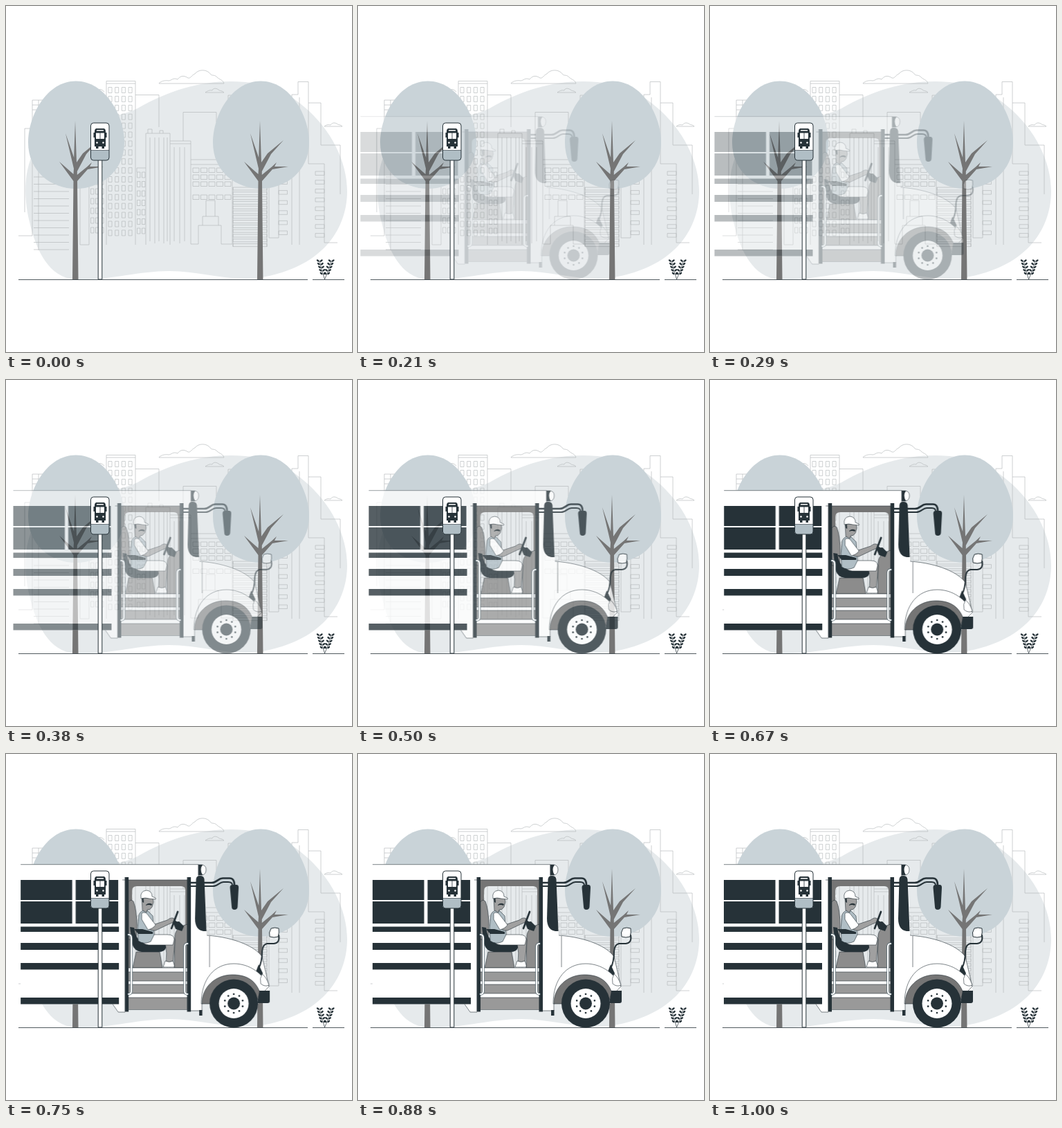
An HTML page that plays this animation: 500x500 px, repeating every 1.04 s.

```html
<!DOCTYPE html>
<html lang="en">
<head>
<meta charset="utf-8">
<title>Bus stop</title>
<style>
html, body { margin: 0; width: 100%; height: 100%; overflow: hidden; background: #fff; }
svg { display: block; width: 100vw; height: 100vh; }
.city { fill: none; stroke: #b4b8ba; stroke-width: .65; }
.dark { fill: #263238; }
.white { fill: #fff; }
.grey { fill: #757575; }
.seat { fill: #8c8c8c; }
.step { fill: #999; }
.skin { fill: #a0a0a0; }
.blue { fill: #b0bec5; }
.line { stroke: #263238; stroke-width: .6; stroke-linejoin: round; }
.pipe { fill: none; stroke: #263238; stroke-width: 2.7; stroke-linecap: round; }
.rail { fill: none; stroke-linecap: round; }
#gate { animation: gate 1.04s step-end infinite; }
#bus { animation: arrive 1.04s infinite; }
@keyframes gate {
  0% { visibility: hidden; }
  12.4%, 100% { visibility: visible; }
}
@keyframes arrive {
  0% { opacity: 0; transform: translateX(-20px); animation-timing-function: cubic-bezier(.36, -.01, .5, 1.38); }
  93%, 100% { opacity: 1; transform: none; }
}
</style>
</head>
<body>
<svg viewBox="0 0 500 500" xmlns="http://www.w3.org/2000/svg">
  <path fill="#e6eaec" d="M100 395C62 393 43 352 34 312C25 275 24 228 50 195C90 160 150 168 190 148C235 122 280 109 325 109C375 109 405 123 430 145C470 178 493 225 493 268C493 315 465 377 365 393C320 398 280 383 236 383C190 383 150 397 100 395Z"/>

  <g class="city">
    <path id="windows"/>
    <path d="M38 332H18M27 298V177H38M38 332V136H62M47 136V353M38 143H55M38 150H52"/>
    <path d="M107 235V345H120V235M130 124Q136 117 142 124"/>
    <path d="M145 345V108.500H187V345M145 112H187M187 128.500H221V175M189 240V234H202"/>
    <path d="M202 345V184H237V345M208 190V340M215 190V343M221 190V340M228 190V343M233 190V340M205 184V178H211V184M222 184V180H227V184"/>
    <path d="M237 195H267V344H278M237 199H267M243 204V340M251 204V343M258 204V340M256 195V153.500H304V168"/>
    <path d="M267 222H310M267 229H327M278 344V317H311V344H327V228M284 317V304H307V317M289 304V281H302V304"/>
    <path d="M321 145V129H335M328 348V262M377 348V262M380 262V335H394V250M413 345V128H422V109.500H437V228H460V342H479M424 132V345M437 140H455V201H483V272"/>
    <path d="M221 112H315C314 107 308 106 305 103C302 99 298 101 296 99C291 91 278 91 273 98C268 100 267 105 263 104C256 99 251 102 248 106C241 103 239 108 235 108C229 107 223 109 221 112Z"/>
    <path d="M288 125H315C312 122 309 123 307 121C303 118 299 119 298 122C294 121 291 123 288 125ZM460 174H486C483 171 480 172 478 170C474 168 471 169 469 172C465 171 462 172 460 174Z"/>
  </g>

  <defs>
    <g id="tree">
      <path fill="#c9d3d8" d="M101 108.500C143 108.500 171 158 171 197C171 240 136 264 101 264C66 264 32 240 32 197C32 158 59 108.500 101 108.500Z"/>
      <path class="grey" d="M96 395.500L97.500 253L77 225L97.500 243L98 235L86 184L98.200 219L100 166L102 226L111 213L134 194L116 214L102.800 239V244L117 232.500L124 226L121 232L141 232L118 236L103 253L104.500 395.500Z"/>
    </g>
  </defs>
  <use href="#tree"/>
  <use href="#tree" x="267"/>

  <path class="line" fill="none" style="stroke-width:.8" d="M18 395.500H436M443 395.500H489"/>
  <g id="plant" class="dark"></g>

  <g id="gate"><g id="bus">
    <!-- door opening -->
    <path class="grey" fill-rule="evenodd" d="M176 182H261V309H176ZM181 309V198Q181 191 188 191H252Q258 191 258 197V309Z"/>
    <path class="seat line" d="M242 309L243 262Q244 254 252 249L261 246V309Z"/>
    <path class="seat line" d="M176 214Q179 209 183 213Q188 225 188 250L187 268H176Z"/>
    <path class="seat line" d="M187 286H221L225 309H182Z"/>
    <path class="dark" d="M178 250L184 251Q186 267 195 272H224Q231 275 230 280Q228 286 219 286H195Q184 285 181 274Z"/>

    <!-- driver -->
    <path class="skin line" d="M231 266Q241 261 243 269L240 302H230Q232 288 229 273Z"/>
    <path class="white line" d="M229 299Q235 302 240 299L242 305V308H226Z"/>
    <path class="white line" d="M194 261H232Q242 261 242 268L240 276H205Q193 275 194 261Z"/>
    <path class="blue line" d="M191 232Q194 225 203 226L211 234L213 261L208 271Q198 276 190 270Q188 250 191 232Z"/>
    <path class="skin line" d="M203 244L214 246L232 240Q238 235 242 238L241 243L234 246L215 255Q207 256 203 250Z"/>
    <path class="white line" d="M195 230Q201 227 205 234L215 247Q212 252 204 254L195 239Z"/>
    <path class="skin line" d="M195 208H211L212 214L210 221Q207 226 203 225L202 229L196 226Z"/>
    <path class="dark" d="M195 208H197.500L198 215L196 214ZM201 218Q205 214 210 217L209 219Q205 217 201 219Z"/>
    <path class="white line" d="M194 209Q192 198 202 197Q210 198 210 206L215 208V210L206 209Q200 207 194 209Z"/>
    <path class="dark" d="M184 253H196L211 257V260H190Z"/>
    <path class="pipe" d="M247 228L238 252M242 241L252 249"/>
    <path class="dark" d="M240 243L249 242L256 249L253 256L244 253Z"/>

    <!-- steps -->
    <path class="white" d="M176 309H261V370H176Z"/>
    <path class="step" d="M176 315H261V328H176ZM176 333H261V346H176ZM176 352H261V369H176Z"/>
    <path class="line" fill="none" d="M176 309H261M176 315H261M176 328H261M176 333H261M176 346H261M176 352H261M176 369.500H261"/>

    <!-- side, cab and bonnet -->
    <path class="white" fill-rule="evenodd" d="M20 159.500H277L278 178H286L289 262C330 265 360 279 369 293L379 336V342L363 361H282V371H266V373H161L153 361.500H20ZM176 182V373H261V182Z"/>
    <path class="line" fill="none" d="M20 159.700H277V178M153 361.500L161 373H171M176 182H261M266 371H282V361M289 262C330 265 360 279 369 293L379 336M293 263V308M167 182H171"/>
    <path class="dark" d="M20 182H161V245H20ZM20 249.500H162V257H20ZM20 273H162V283H20ZM20 302H162V311.500H20ZM20 352H162V361.500H20Z"/>
    <path class="white" d="M20 211H161V213H20ZM94.500 182H99.500V245H94.500Z"/>
    <path class="dark" d="M170.500 178H176V372.500H170.500ZM260.500 178H266V372.500H260.500ZM278 370H282.500V378H278Z"/>
    <path class="dark" d="M273.500 181Q274 176 279 176Q285 176 285.500 181L288.500 256H284Q272 254 272 238Z"/>
    <path class="white line" d="M277 160H282Q288 161 288 167Q288 174 282 175H277Z"/>
    <path class="dark" d="M277 160H283Q278 167 283 175H277Z"/>
    <g id="rails"></g>

    <!-- mirrors -->
    <path class="pipe" d="M266 186H296C304 186 305 179.500 312 179.500H322Q329 179.500 329 190"/>
    <path class="pipe" style="stroke-width:2" d="M266 191H298C305 191 307 185 313 185H320Q326 185 326 190"/>
    <path class="dark" d="M326 189H332Q335 189 335 193L333.500 221Q333 225 329 225Q325 225 325 221L322.500 193Q322.500 189 326 189Z"/>
    <path class="pipe" style="stroke-width:2" d="M393 262Q395 273 386 274H376Q370 275 369 285Q369 300 364 310"/>
    <path class="dark" d="M364 304L370 317L368 320L359 317Z"/>
    <path class="white line" style="stroke-width:1" d="M382 252Q387 250 393 252Q394 258 392 264Q386 266 380 264Q378 258 382 252Z"/>

    <!-- wheel and bumper -->
    <path class="white line" d="M281 361C281 325 300 303 328 303C350 303 369 316 379 336L368 347Z"/>
    <path class="white line" d="M369 318Q375 322 379 334Q373 337 367 332Q365 324 369 318Z"/>
    <path class="grey line" d="M282 361C282 336 302 319 326 319C349 319 360 329 366 345L360 361Z"/>
    <path class="dark" d="M365 342H380V357Q380 360 377 360H362Z"/>
    <circle class="dark" cx="328" cy="360.500" r="35"/>
    <circle class="white" cx="328" cy="360.500" r="21.500"/>
    <circle class="dark" cx="328" cy="360.500" r="9"/>
    <circle class="pipe" cx="328" cy="360.500" r="13.500" pathLength="100" stroke-dasharray="0 10" transform="rotate(-90 328 360.500)"/>
  </g></g>

  <!-- stop sign -->
  <path class="white line" style="stroke-width:1" d="M133.200 222H138.800V395H133.200Z"/>
  <rect class="white" x="122.500" y="169" width="26.500" height="54" rx="4"/>
  <path class="blue" d="M122.500 208.500H149V219Q149 223 145 223H126.500Q122.500 223 122.500 219Z"/>
  <path class="line" d="M122.500 208.500H149"/>
  <rect class="line" fill="none" style="stroke-width:1" x="122.500" y="169" width="26.500" height="54" rx="4"/>
  <path class="dark" d="M130 177H142Q144 178 144 181V183H145.500V190H144V203H142V206H138.500V203H133.500V206H130V203H128V190H126.500V183H128V181Q128 178 130 177Z"/>
  <path class="white" d="M131 179H141V180.500H131ZM130 183.500H135.600V192H130ZM136.400 183.500H142V192H136.400Z"/>
  <circle class="white" cx="131.500" cy="197.500" r="1.300"/>
  <circle class="white" cx="140.500" cy="197.500" r="1.300"/>
</svg>
<script>
const $ = id => document.getElementById(id);
const box = (x, y, w, h) => `M${x} ${y}h${w}v${h}h${-w}Z`;

function grid(x, y, w, h, cols, rows, dx, dy) {
  let d = '';
  for (let r = 0; r < rows; r++)
    for (let c = 0; c < cols; c++) d += box(x + c * dx, y + r * dy, w, h);
  return d;
}

let city = grid(148, 117.5, 5, 8, 4, 17, 9.7, 12.9)
  + grid(189.500, 240, 4.500, 8, 2, 7, 7, 13.5)
  + grid(122.500, 250, 4.500, 8, 3, 6, 7, 14)
  + grid(270, 234, 9, 6.500, 5, 3, 11.5, 10)
  + grid(270, 273, 9, 6.500, 5, 1, 11.5, 10)
  + grid(394, 252, 12.500, 5.500, 1, 6, 0, 14.6)
  + grid(447, 239, 13, 5.500, 1, 8, 0, 12.8)
  + grid(328, 262, 49, 4, 1, 13, 0, 6.8);
for (let y = 247; y < 354; y += 10.5) city += `M40 ${y}H91`;
$('windows').setAttribute('d', city);

const rail = (d, color, width) =>
  `<path class="rail" d="${d}" stroke="${color}" stroke-width="${width}"/>`;
$('rails').innerHTML = ['M176 261Q180 261 180 266V342Q180 347 176 347', 'M261 274Q257 274 257 279V342Q257 347 261 347']
  .map(d => rail(d, '#455a64', 3.4) + rail(d, '#fff', 2.2)).join('');

// Leaf pairs along two leaning stalks.
function stalk(lean) {
  const x0 = 460.5;
  let out = `<path fill="none" stroke="#263238" stroke-width=".7" d="M${x0} 395Q${x0 + lean * .6} 382 ${x0 + lean} 368"/>`;
  for (let i = 0; i < 5; i++) {
    const t = .28 + i * .17, y = 395 - 27 * t;
    const x = x0 + lean * (1.2 * t - .2 * t * t);
    for (const side of [-1, 1])
      out += `<ellipse cx="${x + side * 2.5}" cy="${y - 1}" rx="2.300" ry="1.300" transform="rotate(${side * -38} ${x + side * 2.5} ${y - 1})"/>`;
  }
  return out;
}
$('plant').innerHTML = stalk(-7.5) + stalk(10);
</script>
</body>
</html>
```
